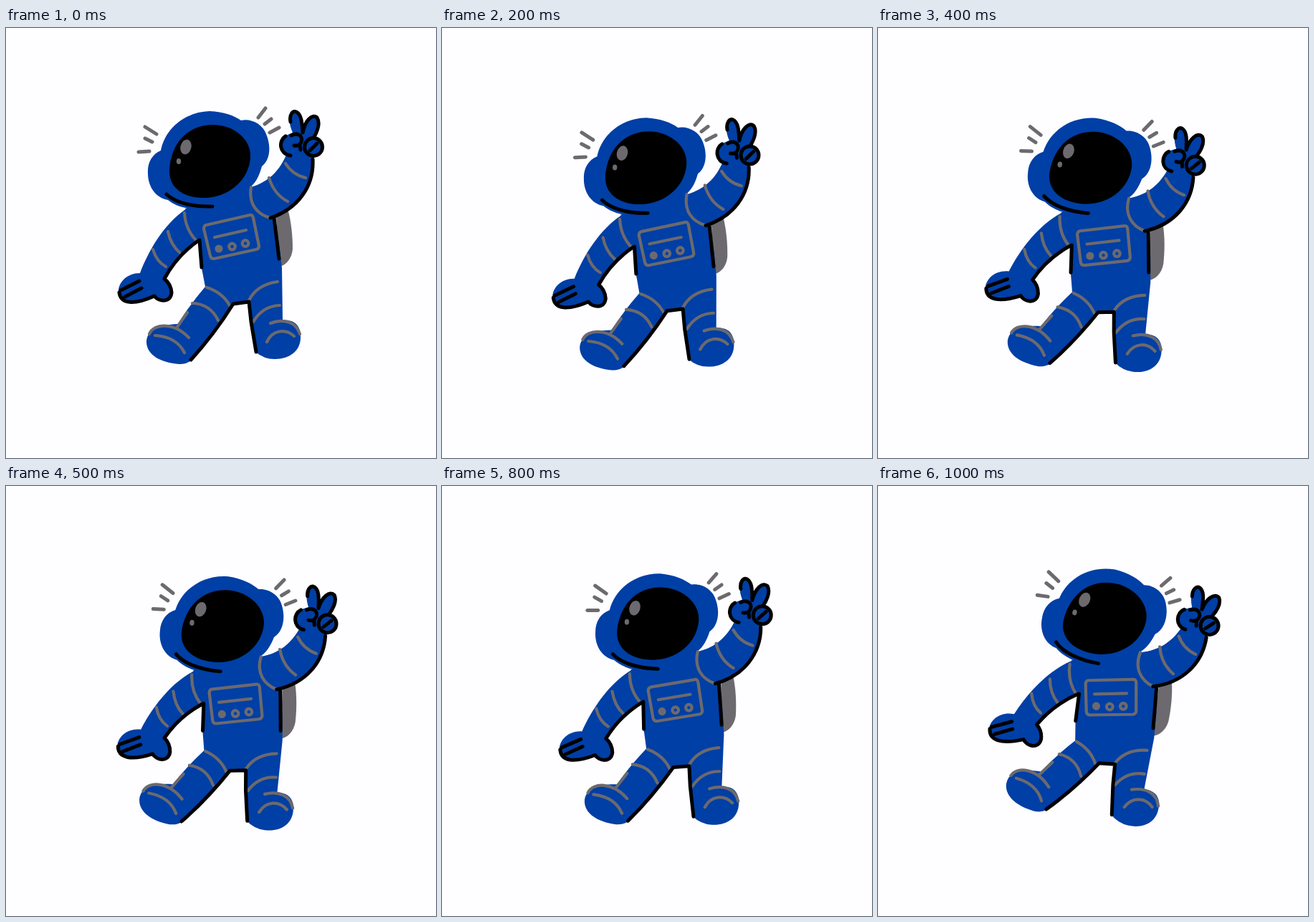
Write an HTML page that moves like this. It is 600x600 px and loops after 1.1 s.

```html
<!DOCTYPE html>
<html>
<head>
<meta charset="utf-8">
<style>
html, body { margin: 0; width: 100%; height: 100%; overflow: hidden; background: #fefdff; }
svg { display: block; width: 100%; height: 100%; }
.blue { fill: #003fa5; }
.gray { fill: #6c6a6e; }
.line { fill: none; stroke: #000; stroke-width: 5; stroke-linecap: round; stroke-linejoin: round; }
.soft { stroke: #6c6a6e; stroke-width: 4.2; }
</style>
</head>
<body>
<svg viewBox="0 0 600 600">
<g id="astronaut">
  <!-- backpack -->
  <path class="gray" d="M376 250L393 252C398 270 400 290 400 308C399 321 392 330 382 333Z"/>
  <g class="blue">
    <!-- helmet -->
    <path d="M216 171C222 140 250 117 284 116C304 117 318 122 328 129C342 126 358 134 363 148C370 164 369 184 357 193C354 204 350 214 342 221V260H250L256 252C242 250 232 245 226 240C208 237 198 220 198 203C197 188 204 176 216 171Z"/>
    <!-- torso and legs -->
    <path d="M250 252L342 221L372 262L381 300L385 335L386 408C402 406 411 415 411 430C412 450 396 462 375 462Q360 462 348 452L339 383L317 385Q290 428 258 464Q252 469 242 469C215 467 197 456 196 439C196 422 212 414 240 413Q255 388 278 361L273 335L270 295Z"/>
    <!-- lowered arm -->
    <path d="M252 252C222 272 200 308 187 342C168 342 156 356 157 369C159 383 178 387 207 374C213 382 231 384 231 369Q229 357 221 350Q240 318 270 296L290 260Z"/>
    <!-- raised arm and hand -->
    <path d="M342 222C368 214 382 198 391 177C379 170 380 153 393 149L400 146C392 128 396 116 404 117C411 119 414 128 414 138C418 124 428 119 434 125C439 133 435 143 430 153C444 157 445 175 429 180C430 215 410 254 369 265Z"/>
  </g>
  <path d="M288 135C318 135 341 155 341 178C341 210 312 237 276 237C246 237 228 222 228 200C229 165 250 136 288 135Z"/>
  <ellipse class="gray" cx="251" cy="166" rx="7.5" ry="10.5" transform="rotate(14 251 166)"/>
  <ellipse class="gray" cx="241" cy="186" rx="3.2" ry="4"/>
  <!-- suit seams -->
  <path class="line soft" d="M249 258C250 275 256 287 266 297M226 284Q230 303 243 314M205 309Q210 326 223 333
    M342 222C338 245 350 260 369 265M367 209Q374 232 393 242M390 189Q400 205 418 209
    M280 362Q302 369 312 387M260 384Q285 385 296 408M339 380Q350 358 379 354M345 410Q358 388 382 387
    M253 397L239 417M200 427C206 412 234 410 255 432M208 429Q238 431 249 453
    M369 412C388 405 405 410 410 427M364 438C372 421 390 419 402 430
    M279 275L340 261Q344 260 345 265L353 304Q353 308 349 309L290 322Q286 322 285 318L276 280Q276 276 279 275Z
    M291 292L335 282"/>
  <circle class="gray" cx="297" cy="308" r="5.6"/>
  <g class="line soft">
    <circle cx="315.500" cy="305" r="4.3"/>
    <circle cx="334" cy="300.500" r="4.300"/>
  </g>
  <!-- rays -->
  <path class="line soft" style="stroke-width:5" d="M194 138L210 148M194 154L204 159M185 173L200 172M362 112L352 125M370 127L361 134M381 139L368 146"/>
  <!-- ink -->
  <path class="line" d="M224 232C236 244 262 250 288 249M374 264L381 322M270 296L273 334M268 297Q238 318 221 350
    Q230 357 231 369C230 384 213 382 207 374C178 387 160 385 158 369M160 366L186 353M166 375L189 363
    M258 463Q290 428 317 385L339 382L342 410L349 452M369 265C408 252 430 220 428 183
    M397 131C395 121 400 115 405 117C413 121 413 134 414 146C417 130 427 119 434 125C439 133 435 143 430 152
    M390 151C380 157 381 176 397 178M398 150C409 144 416 153 411 161Q408 165 402 164M410 163L411 170M424 171L434 161"/>
  <circle class="line" cx="429" cy="166" r="12.500"/>
</g>
</svg>
<script>
// One pose per 100 ms: shift x, shift y, turn in degrees
const poses = [
  [0, 0, 0], [-1, 5, 0.4], [-1.8, 9.8, 0.9], [-2, 12, 3.7],
  [-1.8, 12.8, 6.4], [3.7, 13.2, 6.5], [6.5, 13.2, 4.2], [9.2, 12, 1.9],
  [9.8, 8, 3.2], [9.8, 3.2, 5], [6.2, 4.2, 11.7]
];
const astronaut = document.getElementById("astronaut");

function draw() {
  const step = Math.floor(performance.now() / 100) % poses.length;
  const [x, y, turn] = poses[step];
  astronaut.setAttribute("transform", `translate(${x} ${y}) rotate(${turn} 322 312)`);
  requestAnimationFrame(draw);
}
draw();
</script>
</body>
</html>
```
